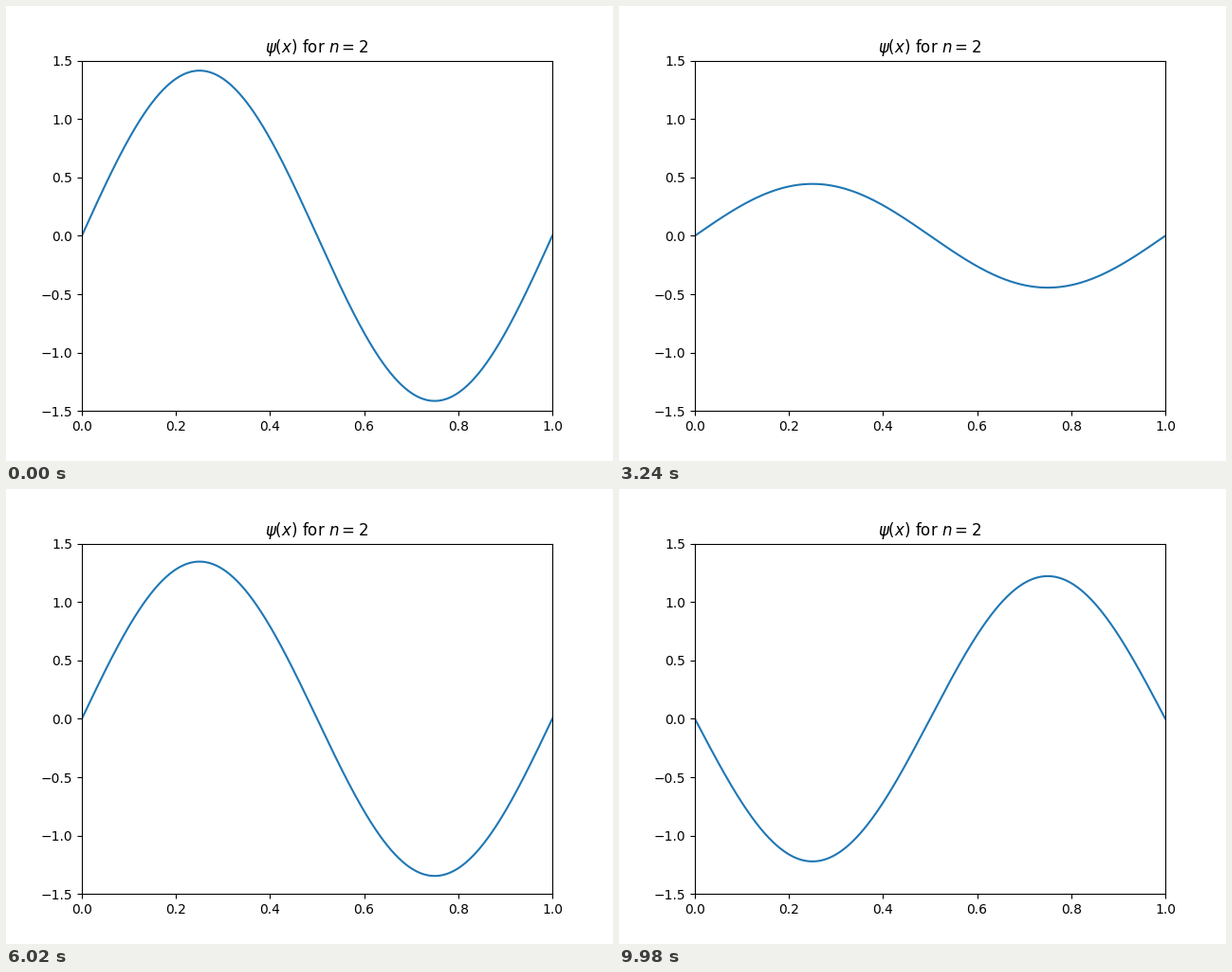
Write a matplotlib script that moves like this. It is 640 by 480 pixels and loops after 10000 ms.

```python
import numpy as np
import matplotlib.pyplot as plt
from matplotlib.animation import FuncAnimation

N = 2                 # quantum number
WIDTH = 1.0           # width of the well
FRAMES = 500

energy = (N * np.pi / WIDTH) ** 2 / 2
times = np.linspace(0, 10, FRAMES)
x = np.linspace(0, WIDTH, 500)
psi = np.sqrt(2 / WIDTH) * np.sin(N * np.pi * x / WIDTH)

fig, ax = plt.subplots(figsize=(6.4, 4.8), dpi=100)
ax.set_xlim(0, WIDTH)
ax.set_ylim(-1.5, 1.5)
ax.set_title(rf"$\psi(x)$ for $n={N}$")
line, = ax.plot(x, psi)


def update(frame):
    """Show the real part of the stationary state at this time."""
    line.set_ydata(psi * np.cos(energy * times[frame]))
    return line,


anim = FuncAnimation(fig, update, frames=FRAMES, interval=20,
                     init_func=lambda: update(0), blit=True,
                     repeat=True, repeat_delay=0)
plt.show()
```
